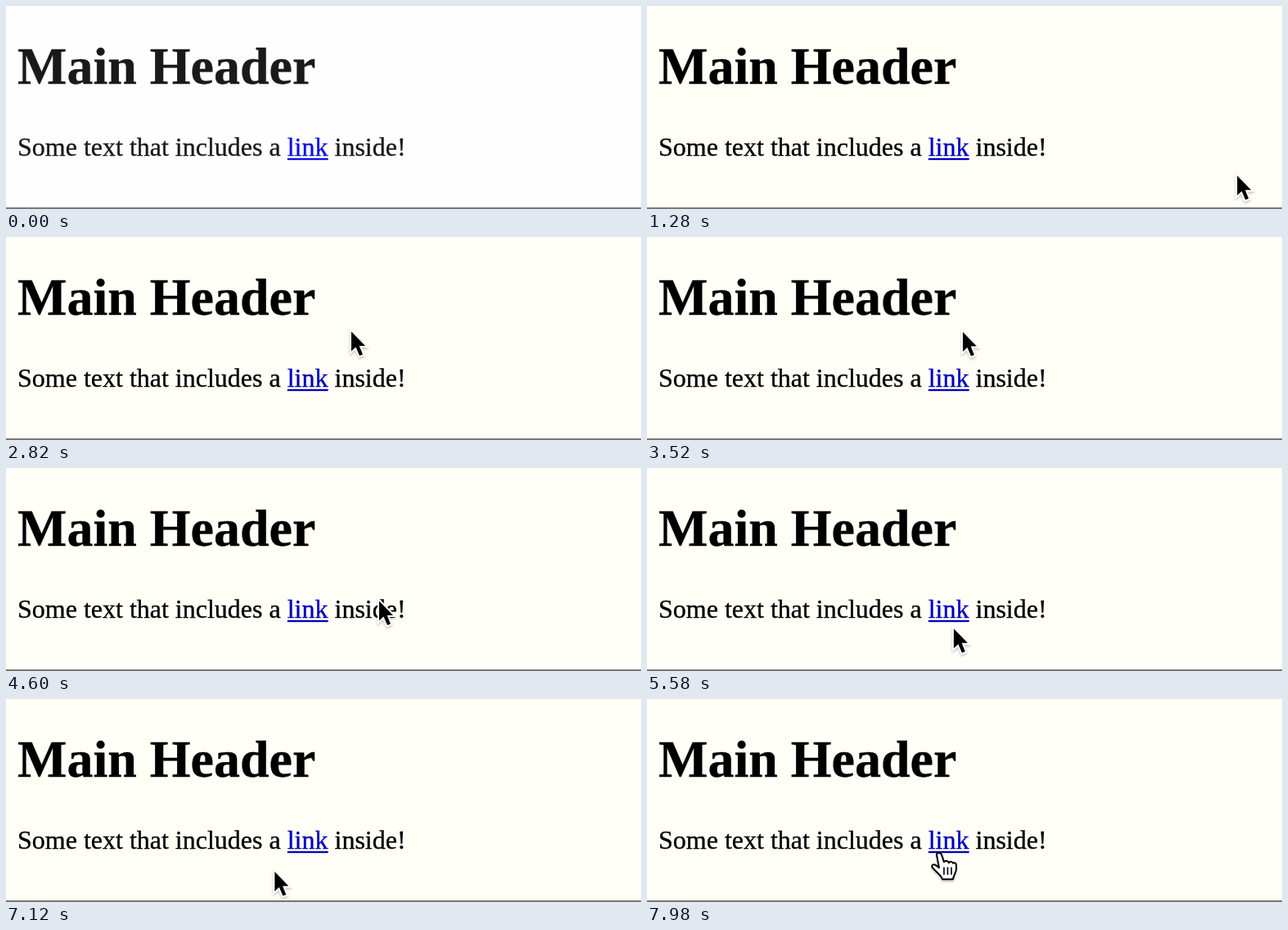
An HTML page that plays this animation: 776 px wide and 248 px high, repeating every 8000 ms.

```html
<!DOCTYPE html>
<html lang="en">
<head>
<meta charset="utf-8">
<title>Hovering a link</title>
<style>
  html, body { margin: 0; width: 100%; height: 100%; overflow: hidden; }
  svg { display: block; width: 776px; height: 248px; }
  text { font-family: "Liberation Serif", Times, serif; font-size: 32px; }
  #page { stroke-width: .35px; }
  #cursor { filter: drop-shadow(0 2px 1.5px rgba(0, 0, 0, .22)); }
  #arrow { stroke: #fff; stroke-width: 4; paint-order: stroke; }
  #hand { fill: #fff; stroke: #000; stroke-width: 2; stroke-linejoin: round; stroke-linecap: round; }
</style>
</head>
<body>
<svg id="stage" viewBox="0 0 776 248">
  <g id="page">
    <text x="14" y="95" style="font-size:64px;font-weight:bold">Main Header</text>
    <text x="14" y="183" xml:space="preserve">Some text that includes a <tspan class="link">link</tspan> inside!</text>
    <rect class="link" x="344" y="186" width="49.5" height="2" stroke="none"/>
  </g>
  <rect y="246" width="776" height="2" fill="#777"/>
  <g id="cursor">
    <path id="arrow" d="M2 2.5v24l5.5-5 4.5 10.5 4-1.5-4.3-10.5h7.3z"/>
    <g id="hand">
      <path d="M-3 2C-3-1 2-1 3 2L6 11C7 9 11 9 12 12C13 10 16 10 17 12.5C18 11 21 12 21 15V19C21 24 18 26 17 32H4C3 27-3 24-8 18C-10 15-7 13-4 15L0 18Z"/>
      <path d="M6 18v8m4.5-8v8m4.5-8v8" stroke-width="1.6"/>
    </g>
  </g>
</svg>
<script>
const LOOP = 8000;
const $ = id => document.getElementById(id);
const links = document.querySelectorAll('.link');

const mix = (a, b, k) => a + (b - a) * k;
const progress = (t, from, to) => Math.min(1, Math.max(0, (t - from) / (to - from)));
const smooth = v => v * v * (3 - 2 * v);
const color = (a, b, k) => `rgb(${a.map((v, i) => Math.round(mix(v, b[i], k)))})`;

// Rises into view, then arcs over the header and settles right of it
function arrive(t) {
  const k = 1 - (1 - progress(t, 1280, 2520)) ** 3;
  const rise = 46 * (1 - smooth(progress(t, 60, 540)));
  return [mix(720, 420, k), mix(206, 113, k) - 147 * Math.sin(Math.PI * k) + rise];
}

// Swings on and off the link while drifting down and left
function sway(t) {
  const u = (t - 4600) / 1000, phase = 2 * Math.PI * u / 1.6;
  return [
    412 - 7.6 * u * u + 42 * Math.cos(phase),
    160 + 21 * u - 2.4 * u * u - 23.6 * Math.sin(phase)
  ];
}

function pointerAt(t) {
  const k = smooth(progress(t, 2820, 3480)), end = sway(t);
  return arrive(t).map((v, i) => mix(v, end[i], k));
}

function draw(t) {
  const k = progress(t, 20, 540);
  const ink = color([26, 26, 26], [0, 0, 0], k);
  const blue = color([16, 16, 232], [0, 0, 192], k);
  const page = $('page').style;
  $('stage').style.background = color([254, 254, 254], [255, 255, 248], k);
  page.fill = page.stroke = ink;
  page.filter = k < 1 ? `blur(${0.6 * (1 - k)}px)` : 'none';
  for (const el of links) el.style.fill = el.style.stroke = blue;

  const [x, y] = pointerAt(t);
  const overLink = x >= 344 && x <= 394 && y >= 140 && y <= 190;
  $('cursor').setAttribute('transform', `translate(${x} ${y})`);
  $('cursor').style.display = t < 60 ? 'none' : '';
  $('arrow').style.display = overLink ? 'none' : '';
  $('hand').style.display = overLink ? '' : 'none';
}

function tick() {
  draw(performance.now() % LOOP);
  requestAnimationFrame(tick);
}
tick();
</script>
</body>
</html>
```
